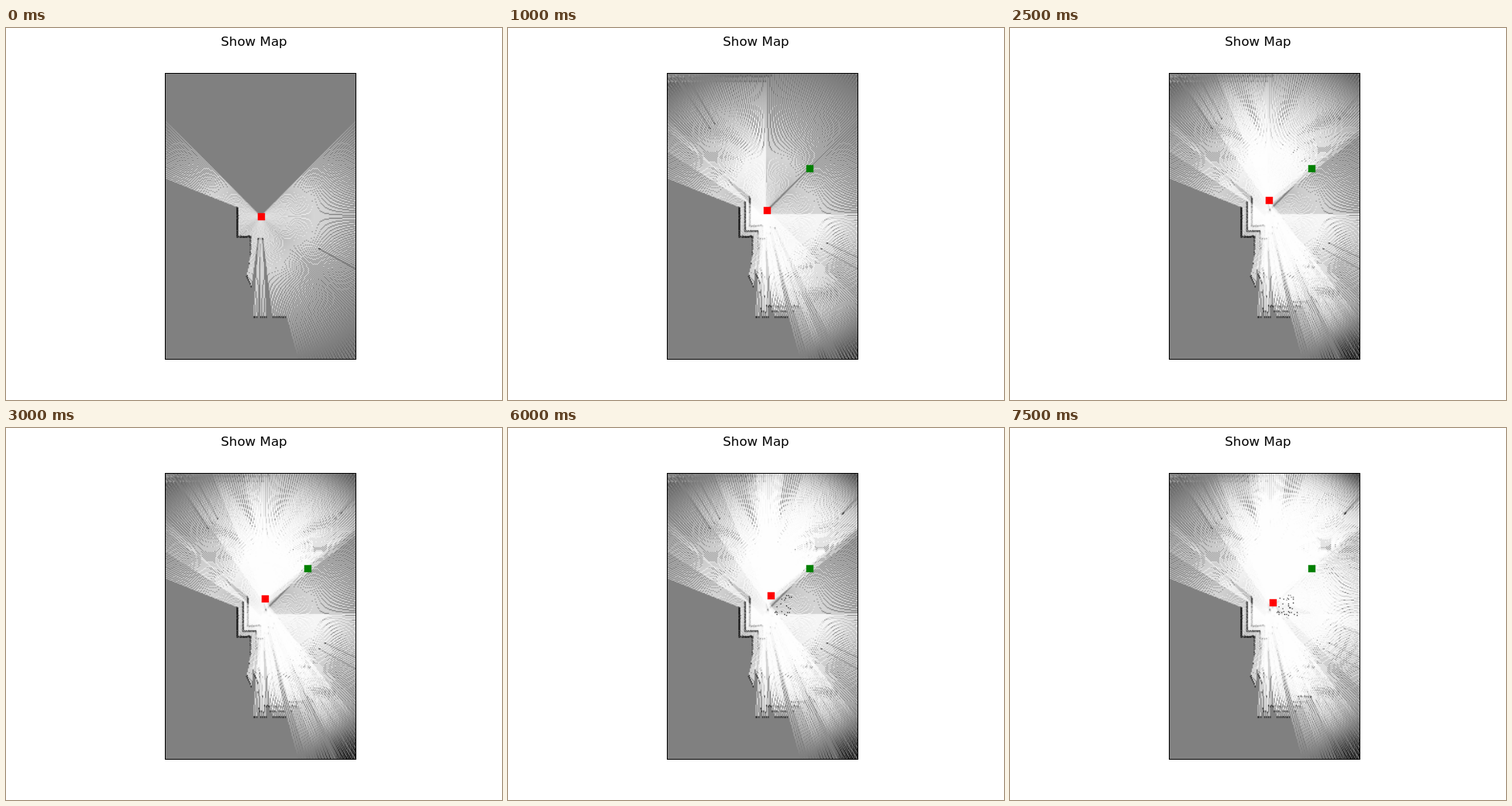
An HTML page with a canvas that plays this animation: 640 px wide and 480 px high, repeating every 8000 ms.

```html
<!DOCTYPE html>
<html lang="en">
<head>
<meta charset="utf-8">
<title>Show Map</title>
<style>
  html, body { margin: 0; width: 100%; height: 100%; overflow: hidden; background: #fff; }
  canvas, svg { position: absolute; left: 0; top: 0; display: block; }
  text { font: 16.67px "DejaVu Sans", sans-serif; }
</style>
</head>
<body>
<canvas id="stage" width="640" height="480"></canvas>
<svg width="640" height="480"><text x="320" y="23" text-anchor="middle">Show Map</text></svg>
<script>
const LOOP = 8000, STEP = 500;
const COLS = 200, ROWS = 300, CELL = 1.232, LEFT = 204.8, TOP = 57.6;
const ctx = document.getElementById('stage').getContext('2d');

// Key points of the robot's path: time, x, y
const path = [
  [0, 329, 243], [500, 332, 241], [1500, 335, 228], [2500, 334, 222],
  [4000, 334, 217], [5000, 334, 216], [6000, 339, 216], [7500, 339, 225]
];
const pauses = [2000, 4500, 7000];

// The room in stage pixels: outlines, and round posts with a radius
const outlines = [
  [[299, 231], [299, 269], [316, 269], [316, 292], [311, 320], [318, 337], [319, 373], [363, 373]],
  [[190, 76], [328, 76]]
];
const posts = [
  [405, 285, 0.8], [254, 136, 1.1], [406, 137, 1.1],
  [326, 272, 0.6], [328.6, 272, 0.3], [331.4, 272, 0.8]
];

let seed = 7;
function random() {
  seed = (seed * 16807) % 2147483647;
  return seed / 2147483647;
}

function poseAt(time) {
  const next = Math.max(1, path.findIndex(p => p[0] >= time));
  const [t0, x0, y0] = path[next - 1], [t1, x1, y1] = path[next];
  const part = (time - t0) / (t1 - t0);
  return { time, x: Math.round(x0 + (x1 - x0) * part), y: Math.round(y0 + (y1 - y0) * part) };
}

// Angles swept by scan k: a turning 270 degree view, a closing cone, a look ahead, a look around
function viewsOf(k) {
  if (k < 3) return [[135 - 45 * k, 405 - 45 * k]];
  const cone = [38, 125 - 13 * (k - 3)];
  if (k < 5) return [cone, [284, 308]];
  if (k < 8) return [cone];
  if (k < 11) return [[84, 96]];
  return [[288 - 28 * (k - 10) + 80, 460 + 18 * (k - 11)], [285, 293]];
}

const odds = new Float32Array(COLS * ROWS);
const toCol = x => Math.floor((x - LEFT) / CELL);
const toRow = y => Math.floor((y - TOP) / CELL);

function add(col, row, amount) {
  if (col < 0 || row < 0 || col >= COLS || row >= ROWS) return false;
  const i = row * COLS + col;
  odds[i] = Math.max(-4, Math.min(6, odds[i] + amount));
  return true;
}

// Weight of one reading: shared by dense rays nearby, fading far away
function confidence(cells) {
  return 1.7 * Math.min(1, (cells + 1) / 57) * (1 - Math.pow(cells / 152, 3));
}

function hitDistance(x, y, dx, dy) {
  let best = Infinity;
  for (const line of outlines) {
    for (let i = 1; i < line.length; i++) {
      const [x1, y1] = line[i - 1], [x2, y2] = line[i];
      const ex = x2 - x1, ey = y2 - y1;
      const det = dx * ey - dy * ex;
      const dist = ((x1 - x) * ey - (y1 - y) * ex) / det;
      const along = ((x1 - x) * dy - (y1 - y) * dx) / det;
      if (dist > 0 && along >= 0 && along <= 1) best = Math.min(best, dist);
    }
  }
  for (const [px, py, radius] of posts) {
    const dist = (px - x) * dx + (py - y) * dy;
    const off = (px - x) * dy - (py - y) * dx;
    if (dist > 0 && Math.abs(off) < radius) best = Math.min(best, dist);
  }
  return best;
}

function castRay(x, y, degrees, driftX, driftY) {
  const angle = degrees * Math.PI / 180;
  const dx = Math.cos(angle), dy = -Math.sin(angle);
  const major = Math.max(Math.abs(dx), Math.abs(dy));
  const end = hitDistance(x - driftX, y - driftY, dx, dy) / CELL - 1 + (random() - 0.5) * 0.8;
  const col = toCol(x), row = toRow(y);
  for (let i = 0, solid = 0; solid < 2; i++) {
    const dist = i / major;
    const blocked = dist >= end;
    if (blocked) solid++;
    const inside = add(col + Math.round(i * dx / major), row + Math.round(i * dy / major),
      confidence(dist) * (blocked ? -1.3 : 1));
    if (!inside) break;
  }
}

function snapshot() {
  const canvas = document.createElement('canvas');
  canvas.width = COLS;
  canvas.height = ROWS;
  const c = canvas.getContext('2d');
  const image = c.createImageData(COLS, ROWS);
  odds.forEach((value, i) => {
    const grey = 255 / (1 + Math.exp(-value));
    image.data.set([grey, grey, grey, 255], i * 4);
  });
  c.putImageData(image, 0, 0);
  return canvas;
}

function scan({ time, x, y }, k) {
  const drift = Math.min(k, 4) * 6.7;
  for (const [from, to] of viewsOf(k)) {
    for (let a = from; a <= to; a++) castRay(x, y, a, drift, -drift);
  }
  // Stray echoes beside the robot
  for (let n = 0; k >= 8 && n < 7; n++) {
    add(toCol(343 + random() * 28), toRow(216 + random() * 26), -8);
  }
  return { time, x, y, map: snapshot() };
}

const times = [];
for (let t = 0; t < LOOP; t += STEP) {
  if (!pauses.includes(t)) times.push(t);
}
const scans = times.map(poseAt).map(scan);

function marker(x, y, color) {
  ctx.fillStyle = color;
  ctx.fillRect(x - 4.2, y - 4.2, 9.4, 9.4);
}

function draw(time) {
  const { x, y, map } = scans.filter(s => s.time <= time).pop();
  ctx.fillStyle = '#fff';
  ctx.fillRect(0, 0, 640, 480);
  ctx.save();
  ctx.beginPath();
  ctx.rect(205, 58, 247, 370);
  ctx.clip();
  ctx.drawImage(map, LEFT, TOP, COLS * CELL, ROWS * CELL);
  ctx.restore();
  ctx.strokeStyle = '#000';
  ctx.lineWidth = 1;
  ctx.strokeRect(205.5, 58.5, 246, 369);
  if (time >= STEP) marker(389, 181, '#008000');
  marker(x, y, '#f00');
}

const start = performance.now();
function tick() {
  draw((performance.now() - start) % LOOP);
  requestAnimationFrame(tick);
}
tick();
</script>
</body>
</html>
```
